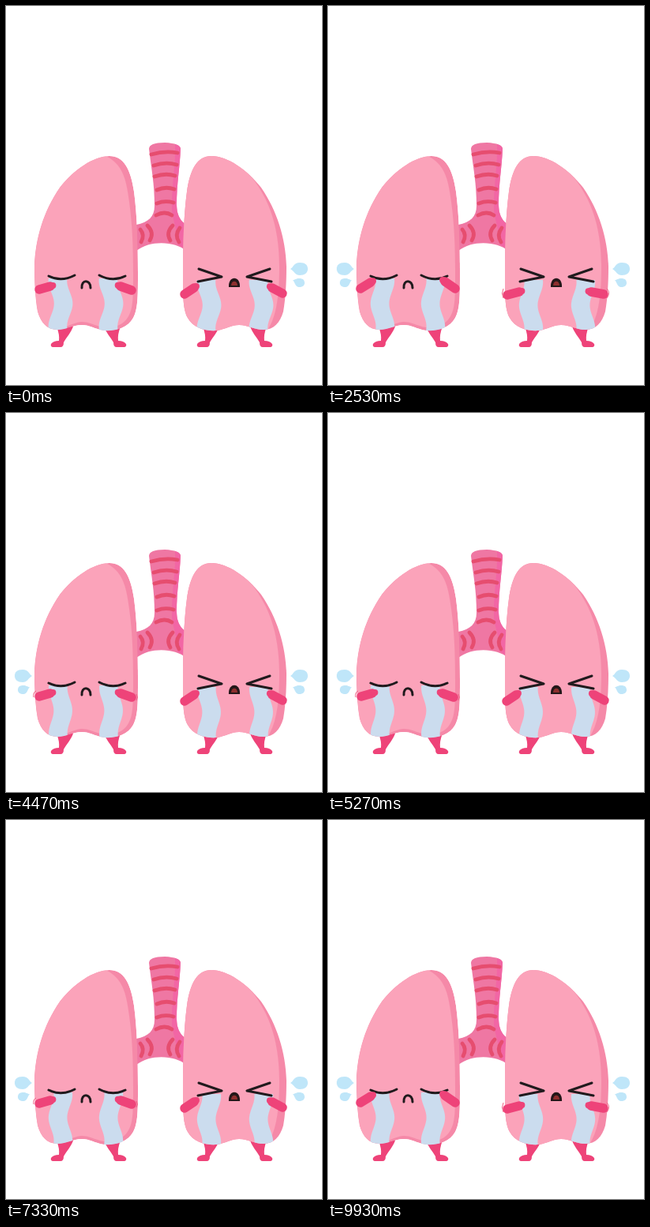
Animation, 400 px wide and 480 px high, one loop 9.99 s. Source, as an HTML page:

```html
<!DOCTYPE html>
<html lang="en">
<head>
<meta charset="utf-8">
<title>Crying lungs</title>
<style>
html, body { margin: 0; width: 100%; height: 100%; overflow: hidden; background: #fff; }
svg { display: block; width: 400px; height: 480px; }
.hot { fill: #ee4379; }
.arm { fill: none; stroke: #ee4379; stroke-width: 11.5; stroke-linecap: round; }
.ghost { fill: none; stroke: #ee5f83; stroke-width: 1; }
.face { fill: none; stroke: #201a1d; stroke-width: 3; stroke-linecap: round; stroke-linejoin: round; }
.ring { fill: none; stroke: #e64d6f; stroke-width: 4.8; stroke-linecap: round; }
.tear { fill: #cbdcee; }
.drop { fill: #bfe6f9; }
</style>
</head>
<body>
<svg viewBox="0 0 400 480">
  <defs>
    <path id="lung" d="M131 190 C149 190 158 207 162 235 C166 265 167 300 167 340 C167 368 167 384 161 395 C154 408 138 412 124 411 C112 409 106 404 96 404 C84 404 78 410 65 410 C52 410 44 401 40 387 C37 370 36 350 36 330 C37 294 48 259 68 230 C86 207 111 190 131 190 Z"/>
    <clipPath id="clipL"><use href="#lung"/></clipPath>
    <clipPath id="clipR"><use href="#lung" transform="matrix(-1 0 0 1 391 0)"/></clipPath>
    <path id="leg" class="hot" d="M64 406 L85 406 C82 414 77 419 73 426 Q73 432 69 432 L59 432 Q56 431 57 428 Q60 424 67 424 Q68 416 64 406 Z"/>
    <g id="drops" class="drop">
      <path d="M360 333 C364 331 364 325 372 325 C379 325 382 328 382 333 C382 338 378 341 372 341 C366 341 365 336 360 333 Z"/>
      <path d="M363 347 C366 347 367 345 371 345 C376 345 378 347 378 351 C378 354 375 356 371 356 C366 356 366 350 363 347 Z"/>
    </g>
  </defs>

  <path d="M181 181 Q181 173 201 173 Q221 174 221 181 C220 205 216 225 216 252 Q216 269 228 277 L228 310 C214 298 183 296 165 310 L165 277 C180 274 188 267 188 253 C188 224 184 207 181 181 Z" fill="#ef77a3"/>
  <path d="M214 175 Q221 177 221 181 C220 205 216 225 216 252 Q216 268 226 276 L226 308 Q221 304 217 302 C218 282 209 270 210 252 C210 225 215 200 214 175 Z" fill="#f266a5"/>
  <g class="ring">
    <path d="M184 188 Q201 183 217 186"/>
    <path d="M187 202 Q202 197 216 201"/>
    <path d="M188 216 Q202 211 214 215"/>
    <path d="M191 233 Q202 228 213 232"/>
    <path d="M191 250 Q201 246 212 249"/>
    <path d="M190 265 Q201 259 210 265"/>
    <path d="M170 283 Q176 290 171 299"/>
    <path d="M179 278 Q188 287 182 297"/>
    <path d="M211 278 Q202 287 208 297"/>
    <path d="M220 281 Q213 290 219 299"/>
  </g>

  <use href="#leg"/>
  <use href="#leg" transform="matrix(-1 0 0 1 209 0)"/>
  <use href="#leg" transform="translate(185 0)"/>
  <use href="#leg" transform="matrix(-1 0 0 1 394 0)"/>

  <g clip-path="url(#clipL)">
    <use href="#lung" fill="#f589a8"/>
    <path d="M112 186 C138 190 150 207 154 235 C160 270 161 305 161 340 C161 368 161 383 155 393 C148 405 136 408 124 407 C112 405 106 400 96 400 C88 400 80 405 64 411 L20 420 L20 180 Z" fill="#fba3ba"/>
    <path class="tear"/><path class="tear"/>
  </g>
  <g clip-path="url(#clipR)">
    <path d="M215 185 H365 V420 H215 Z" fill="#f589a8"/>
    <path d="M257 186 C290 191 311 212 325 238 C341 266 346 300 346 330 C346 365 343 396 328 415 L215 420 L215 185 Z" fill="#fba3ba"/>
    <path class="tear"/><path class="tear"/>
  </g>

  <g class="face">
    <path d="M54 342 Q70 350 87 341"/>
    <path d="M118 341 Q135 350 151 342"/>
    <path d="M96 357 C95 346 107 346 107 357"/>
    <path d="M244 333 L273 343 L243 349"/>
    <path d="M334 333 L305 343 L336 349"/>
  </g>
  <path d="M282 356 C281 341 297 341 296 356 Z" fill="#241719"/>
  <path d="M285 354 C285 347 293 347 293 354 Z" fill="#8e2f2f"/>

  <g id="poseA"></g>
  <g id="poseB"></g>
  <g id="ghostA" class="ghost"><path d="M38 352 Q34 354 35 360"/><path d="M165 356 Q168 360 165 364"/></g>
  <g id="ghostB" class="ghost"><path d="M222 358 Q219 364 222 370"/><path d="M353 358 Q358 363 353 370"/></g>
  <use href="#drops"/>
  <use id="dropsL" href="#drops" transform="matrix(-1 0 0 1 393 0)"/>
</svg>
<script>
const LOOP = 9990, BEAT = 1000, SWAY = 400;
const $ = id => document.getElementById(id);

// An arm is a thick capsule with a narrower tip reaching past its inner end.
const arm = (x, y, tx, ty) => {
  const k = 3.5 / Math.hypot(tx - x, ty - y);
  return `<path class="arm" d="M${x} ${y} L${tx} ${ty}"/>` +
    `<circle class="hot" cx="${tx + (tx - x) * k}" cy="${ty + (ty - y) * k}" r="4"/>`;
};
$('poseA').innerHTML = arm(42, 359, 56, 355) + arm(159, 360, 145, 355) +
  arm(226, 365, 238, 357) + arm(350, 364, 337, 357);
$('poseB').innerHTML = arm(41, 358, 54, 350) + arm(161, 358, 148, 349) +
  arm(227, 366, 242, 362) + arm(349, 365, 333, 362);

const tears = [[69, 345], [133, 345], [257, 347], [323, 347]];
const shapes = document.querySelectorAll('.tear');

function tearPath([x, top], bend) {
  const left = [], right = [];
  for (let y = top; y <= 415; y += 2) {
    const c = x + bend * Math.sin(2 * Math.PI * ((y - top) / 58 - .3));
    left.push(`${(c - 11.8).toFixed(2)} ${y}`);
    right.unshift(`${(c + 11.8).toFixed(2)} ${y}`);
  }
  return `M${left.concat(right).join('L')}Z`;
}

// The tears swing quickly between two mirrored bends and rest at each.
const bendAt = t => 3.6 * Math.max(-1, Math.min(1, 2 * Math.cos(2 * Math.PI * t / SWAY)));

const show = (id, on) => $(id).setAttribute('visibility', on ? 'visible' : 'hidden');

function draw(t) {
  const swapped = t % BEAT >= BEAT / 2, begun = t >= BEAT / 2;
  show('poseA', !swapped);
  show('poseB', swapped);
  show('ghostA', !swapped && begun);
  show('ghostB', swapped);
  show('dropsL', begun);
  const bend = bendAt(t);
  tears.forEach((tear, i) => shapes[i].setAttribute('d', tearPath(tear, bend)));
}

const start = performance.now();
function tick() {
  draw((performance.now() - start) % LOOP);
  requestAnimationFrame(tick);
}
tick();
</script>
</body>
</html>
```
